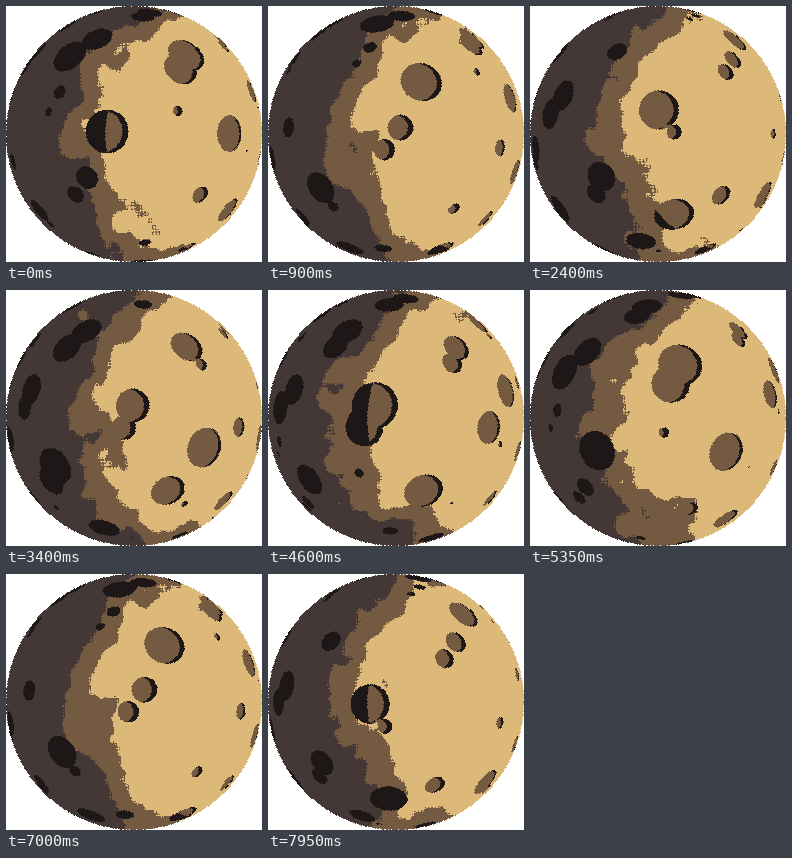
Recreate the animation shown at these times as an HTML page with a canvas. Size 256 by 256 pixels, loop 8000 ms.

```html
<!DOCTYPE html>
<html lang="en">
<head>
<meta charset="utf-8">
<title>Turning moon</title>
<style>
  html, body { margin: 0; width: 100%; height: 100%; overflow: hidden; background: #fff; }
  canvas { display: block; width: 100vmin; height: 100vmin; image-rendering: pixelated; }
</style>
</head>
<body>
<canvas id="moon" width="256" height="256"></canvas>
<script>
const STAGE = 256, CELLS = 256, STEP = 50, LOOP = 8000, TURN = 6000;
const SEED = 7.8, TILT = 224.2 * Math.PI / 180;
const LIGHT = 0.25, GROUND = 8, CRATERS = 5;
const MID_EDGE = 0.615, DARK_EDGE = 0.729, CRATER_EDGE = 0.465;
const DITHER = 2 / CELLS, RIM = (LIGHT - 0.5) * 0.03;

const rgba = (r, g, b) => (255 << 24 | b << 16 | g << 8 | r) >>> 0;
const SAND = rgba(220, 184, 121), BROWN = rgba(115, 90, 65);
const DARK = rgba(67, 56, 54), BLACK = rgba(29, 24, 23);

const fract = v => v - Math.floor(v);
const ease = f => f * f * (3 - 2 * f);
const mix = (a, b, k) => a + (b - a) * k;
const dist = (x, y) => Math.sqrt(x * x + y * y);

// Repeating lattice of random values
function lattice(size) {
  const table = Array.from({ length: size * size }, (_, n) =>
    fract(Math.sin((n % size) * 12.9898 + Math.floor(n / size) * 78.233) * 15.5453 * SEED));
  return (x, y) => table[(y % size) * size + x % size];
}
const groundRand = lattice(GROUND), craterRand = lattice(CRATERS);

function noise(x, y) {
  const i = Math.floor(x), j = Math.floor(y), fx = ease(x - i), fy = ease(y - j);
  return mix(mix(groundRand(i, j), groundRand(i + 1, j), fx),
             mix(groundRand(i, j + 1), groundRand(i + 1, j + 1), fx), fy);
}

function fbm(x, y) {
  let sum = 0;
  for (let scale = 0.5; scale > 0.05; scale /= 2, x *= 2, y *= 2) sum += noise(x, y) * scale;
  return sum;
}

// One round pit per lattice cell; 0 inside, 1 outside
function pit(x, y) {
  const row = Math.floor(y);
  x += row * 0.31;
  const col = Math.floor(x), h = craterRand(col, row), mid = 0.25 + h * 0.5, r = h * 0.25;
  const d = dist(x - col - mid, y - row - mid);
  return ease(Math.min(1, Math.max(0, (d - 0.9 * r) / (0.1 * r))));
}

function crater(u, v, turn) {
  const x = (u + turn) * CRATERS + 11, y = v * CRATERS + 11;
  return 1 - pit(x, y) * pit(x + 1, y + 1);
}

const cells = [];
for (let j = 0; j < CELLS; j++) for (let i = 0; i < CELLS; i++) {
  const x = (i + 0.5) / CELLS, y = (j + 0.5) / CELLS;
  const dx = x * 2 - 1, dy = y * 2 - 1, rr = dx * dx + dy * dy;
  if (rr >= 1) continue;
  const bulge = 1 + Math.sqrt(1 - rr), warp = fbm(x, y);
  cells.push({
    index: j * CELLS + i,
    gx: x * GROUND + warp, gy: y * GROUND + warp,
    u: dx / bulge / 2 + 0.5, v: dy / bulge / 2 + 0.5,
    light: dist(x - LIGHT, y - LIGHT),
    odd: (i + j) % 2
  });
}

// Stage pixel -> tilted cell
const lookup = new Int32Array(STAGE * STAGE);
const cos = Math.cos(TILT), sin = Math.sin(TILT);
for (let n = 0; n < lookup.length; n++) {
  const x = (n % STAGE + 0.5) / STAGE - 0.5, y = (Math.floor(n / STAGE) + 0.5) / STAGE - 0.5;
  const i = Math.floor((x * cos - y * sin + 0.5) * CELLS);
  const j = Math.floor((x * sin + y * cos + 0.5) * CELLS);
  lookup[n] = Math.min(i, j) < 0 || Math.max(i, j) >= CELLS ? -1 : j * CELLS + i;
}

function shade(c, turn) {
  const pitted = crater(c.u, c.v, turn);
  if (pitted >= 0.5) {
    if (c.light > CRATER_EDGE) return BLACK;
    const inRim = crater(c.u + RIM, c.v + RIM, turn) < pitted - (0.5 - c.light) * 2;
    return inRim ? BLACK : BROWN;
  }
  const d = c.light + fbm(c.gx + turn * GROUND, c.gy) * 0.3;
  const past = edge => d > edge + (c.odd ? 0 : DITHER);
  return past(DARK_EDGE) ? DARK : past(MID_EDGE) ? BROWN : SAND;
}

const ctx = document.getElementById('moon').getContext('2d');
const image = ctx.createImageData(STAGE, STAGE);
const pixels = new Uint32Array(image.data.buffer);
const colors = new Uint32Array(CELLS * CELLS);

function draw(time) {
  const turn = time / TURN;
  for (const c of cells) colors[c.index] = shade(c, turn);
  for (let n = 0; n < pixels.length; n++) pixels[n] = lookup[n] < 0 ? 0 : colors[lookup[n]];
  ctx.putImageData(image, 0, 0);
}

let start = null, shown = -1;
function tick(now) {
  if (start === null) start = now;
  const time = Math.floor((now - start) / STEP) * STEP % LOOP;
  if (time !== shown) draw(shown = time);
  requestAnimationFrame(tick);
}
draw(0);
requestAnimationFrame(tick);
</script>
</body>
</html>
```
